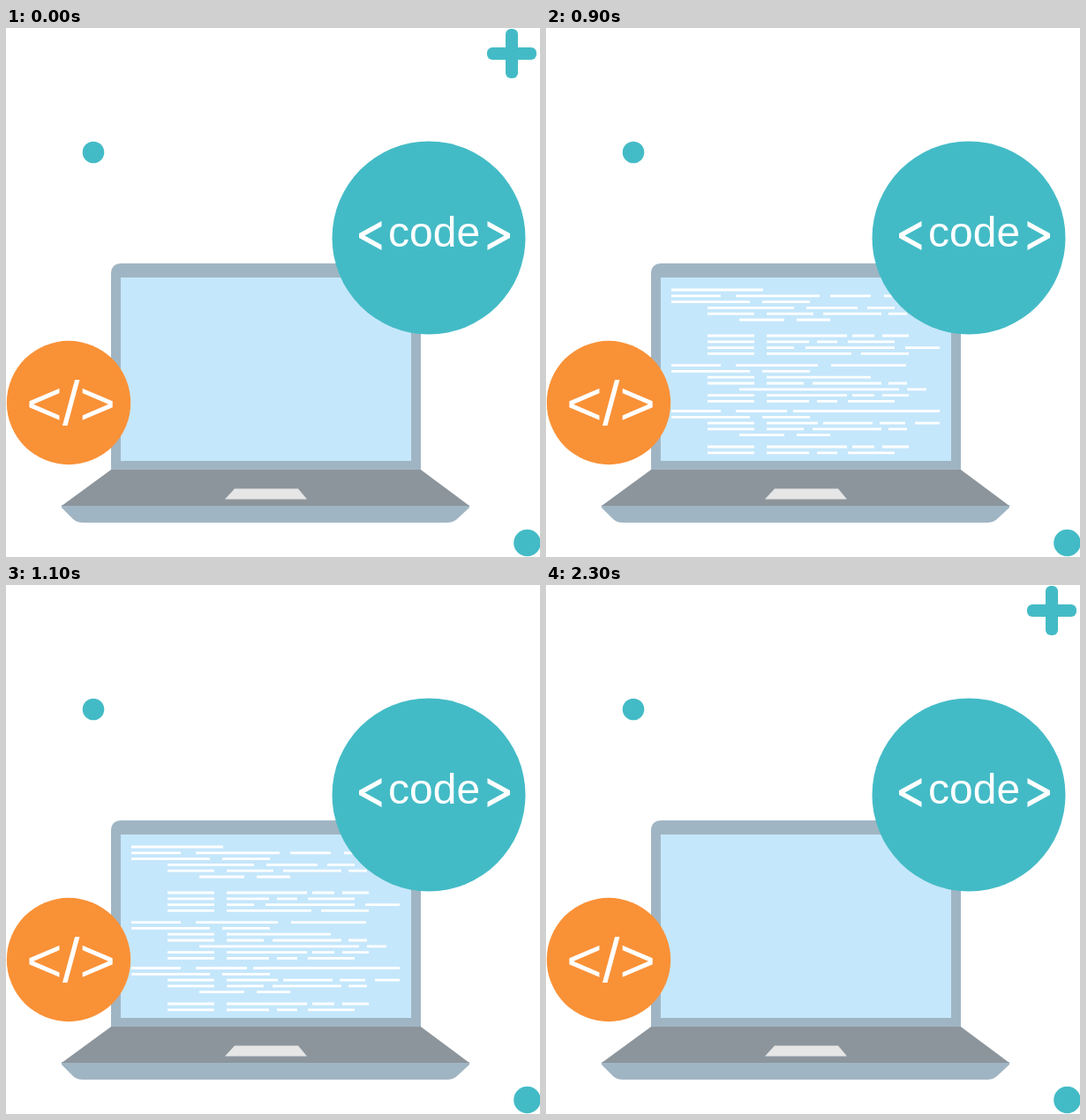
These frames come from a looping animation (605 by 600 pixels, 2.7 s). An HTML page:

```html
<!DOCTYPE html>
<html lang="en">
<head>
<meta charset="utf-8">
<title>Laptop with code</title>
<style>
  html, body { margin: 0; width: 100%; height: 100%; overflow: hidden; background: #fff; }
  svg { display: block; width: 605px; height: 600px; }
  text { font-family: "Liberation Sans", Arial, sans-serif; fill: #fff; }
</style>
</head>
<body>
<svg viewBox="0 0 605 600">
  <g fill="#43bbc6">
    <g id="plus">
      <rect x="566" y="1" width="14" height="56" rx="6"/>
      <rect x="545" y="22" width="56" height="14" rx="6"/>
    </g>
    <g id="dots">
      <circle cx="99" cy="141" r="12.3"/>
      <circle cx="590.5" cy="584" r="15.3"/>
    </g>
  </g>

  <path fill="#a0b5c3" d="M119 502V279Q119 267 131 267H458Q470 267 470 279V502Z"/>
  <path fill="#c5e7fb" d="M130 283H459V491H130Z"/>
  <g id="code" stroke="#fff" stroke-width="2.8"></g>
  <path fill="#a0b5c3" d="M63 541H525V544L512 556Q507 561 500 561H87Q80 561 76 557L63 544Z"/>
  <path fill="#8c959c" d="M119 501H470L525 542H63Z"/>
  <path fill="#e6e6e6" d="M259 522.500H331L341 534.500H248Z"/>

  <circle cx="479" cy="238" r="109.500" fill="#43bbc6"/>
  <path id="angle" fill="#fff" d="M425.500 219L400 233V238L425.500 252V246L406.500 235.500L425.500 225Z"/>
  <use href="#angle" transform="matrix(-1 0 0 1 971 0)"/>
  <text x="433" y="248" font-size="48">code</text>

  <circle cx="71" cy="425" r="70.200" fill="#f99137"/>
  <text x="23" y="450" font-size="70">&lt;/&gt;</text>
</svg>
<script>
const $ = id => document.getElementById(id);

// Each row lists the dashes of one line of code as start-end pairs.
const wide = "142-231 245-299";
const call = "183-236 250-341 347-372 381-411";
const args = "183-236 250-298 307-330 342-395";
const tail = "183-236 250-292 302-380 388-409";
const inner = "219-270 284-322";
const blocks = [
  [297, ["142-246", "142-198 215-310 322-368 383-410", wide,
         "183-281 295-353 364-395", "183-236 250-303 314-380 388-409", inner]],
  [349, [call, args, "183-236 250-281 294-395 407-446", "183-236 250-346 357-411"]],
  [382.6, ["142-198 215-308 323-408", wide, "183-236 250-368", tail,
           "219-400 409-431", call, args]],
  [434.5, ["142-198 215-273 280-446", wide,
           "183-236 250-308 314-370 378-407 418-446", tail, inner]],
  [475, [call, args]]
];

const rows = blocks.flatMap(([top, lines]) => lines.map((line, i) => {
  const row = document.createElementNS("http://www.w3.org/2000/svg", "path");
  const y = top + i * 6.8;
  row.setAttribute("d", line.split(" ").map(dash => {
    const [from, to] = dash.split("-");
    return `M${from} ${y}H${to}`;
  }).join(""));
  return $("code").appendChild(row);
}));

// Start time, visible rows, plus shown, dots shown
const steps = [
  [0, 0, 1, 1], [400, 6, 1, 1], [800, 15, 1, 1],
  [900, 24, 0, 1], [1000, 24, 0, 0], [1100, 24, 0, 1],
  [1500, 15, 1, 1], [1900, 6, 1, 1], [2300, 0, 1, 1]
];

const show = (el, on) => el.style.visibility = on ? "visible" : "hidden";

function draw() {
  const time = performance.now() % 2700;
  const [, count, plus, dots] = steps.findLast(step => step[0] <= time);
  rows.forEach((row, i) => show(row, i < count));
  show($("plus"), plus);
  show($("dots"), dots);
  requestAnimationFrame(draw);
}
draw();
</script>
</body>
</html>
```
